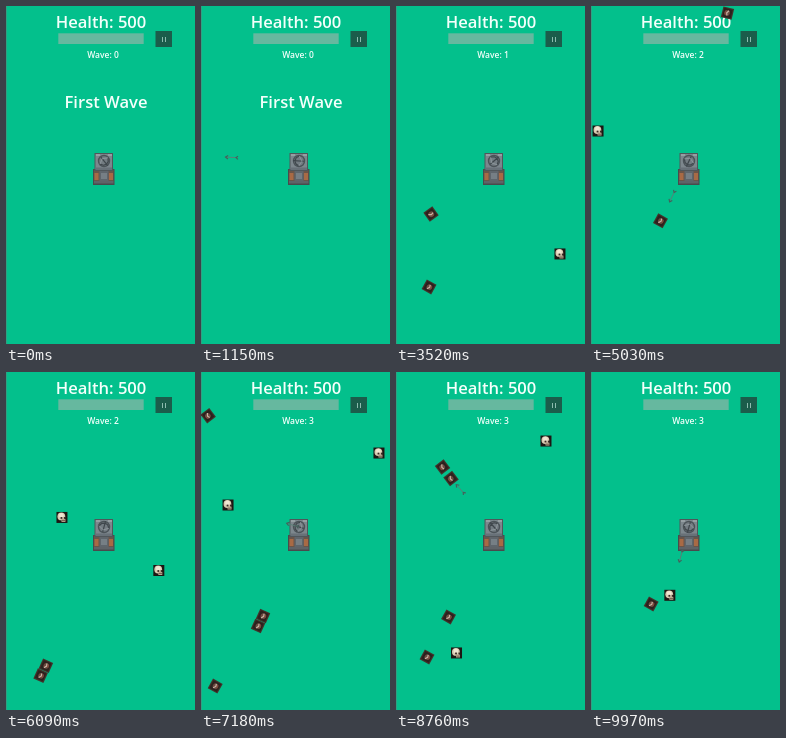
Recreate the animation shown at these times as an HTML page with a canvas. Size 189 px wide and 338 px high, loop 10000 ms.

```html
<!DOCTYPE html>
<html>
<head>
<meta charset="utf-8">
<style>
  html, body { margin: 0; width: 100%; height: 100%; overflow: hidden; background: #03c08c; }
  canvas { display: block; width: 189px; height: 338px; }
</style>
</head>
<body>
<canvas id="stage" width="189" height="338"></canvas>
<script>
const ctx = document.getElementById('stage').getContext('2d');
const LOOP = 10000, WALK = 0.05, FLY = 0.45;
const GOAL = { x: 98, y: 163 }, BOW = { x: 98, y: 155 };
const WAVES = [1760, 4300, 6400];

// kind, x and y at time t, time of death, time of birth
const enemies = [
  ['skull', 180, 79, 2390, 3050, 2240],
  ['beast', 35, 208, 3520, 3900],
  ['skull', 164, 248, 3520, 4450],
  ['beast', 33, 281, 3520, 5085, 2240],
  ['beast', 136.5, 7, 5030, 5950],
  ['skull', 7, 125, 5030, 6350],
  ['skull', 186, 220, 5300, 6750],
  ['skull', 27, 133, 7180, 7316],
  ['beast', 62, 244, 7180, 7640, 5060],
  ['beast', 57, 254, 7180, 8000],
  ['skull', 178, 81, 7180, 8300],
  ['beast', 55, 106.5, 8760, 8789],
  ['beast', 46.5, 95, 8760, 9140, 7200],
  ['beast', 52.5, 245, 8760, 9420],
  ['skull', 150, 69, 8760, 9700, 7200],
  ['skull', 60.5, 281, 8760, 10052],
  ['beast', 31, 285, 8760, 10500]
].map(([kind, x, y, at, death, birth = 0]) => {
  const angle = Math.atan2(GOAL.y - y, GOAL.x - x);
  const pos = t => ({
    x: x + Math.cos(angle) * WALK * (t - at),
    y: y + Math.sin(angle) * WALK * (t - at)
  });
  return { kind, angle, pos, death, birth };
});

function shot(target, end) {
  const dx = target.x - BOW.x, dy = target.y - BOW.y;
  return { angle: Math.atan2(dy, dx), start: end - Math.hypot(dx, dy) / FLY, end };
}

const shots = [
  shot({ x: 20, y: 174 }, 240),
  shot({ x: 3, y: 214 }, 980),
  shot({ x: 4, y: 150 }, 1210),
  shot({ x: 161, y: 94 }, 1420),
  ...enemies.map(e => shot(e.pos(e.death), e.death))
];

function rect(color, x, y, w, h) {
  ctx.fillStyle = color;
  ctx.fillRect(x, y, w, h);
}

function stroke(color, width, ...lines) {
  ctx.strokeStyle = color;
  ctx.lineWidth = width;
  ctx.beginPath();
  for (const [x1, y1, ...rest] of lines) {
    ctx.moveTo(x1, y1);
    for (let i = 0; i < rest.length; i += 2) ctx.lineTo(rest[i], rest[i + 1]);
  }
  ctx.stroke();
}

function disc(color, x, y, r) {
  ctx.fillStyle = color;
  ctx.beginPath();
  ctx.arc(x, y, r, 0, 7);
  ctx.fill();
}

function label(text, x, y, size) {
  ctx.font = `600 ${size}px "Open Sans", sans-serif`;
  ctx.textAlign = 'center';
  ctx.fillStyle = '#f4fffb';
  ctx.fillText(text, x, y);
}

function placed(x, y, angle, draw) {
  ctx.save();
  ctx.translate(x, y);
  ctx.rotate(angle);
  draw();
  ctx.restore();
}

function skull() {
  rect('#1d1613', -5.5, -5.5, 11, 11);
  disc('#d9cbb2', -0.6, -1, 3.9);
  disc('#f0e6d2', -0.6, -2, 2.4);
  rect('#b8a68c', -0.5, 1.5, 4, 3);
  rect('#3a2a24', -1.4, -0.4, 1.8, 1.8);
  rect('#3a2a24', 1.9, -0.4, 1.6, 1.8);
  rect('#5d4a3e', 0, 2.8, 3.2, 0.7);
}

function beast() {
  rect('#43322a', -5.5, -5.5, 11, 11);
  rect('#2c211e', -4.3, -4.3, 8.6, 8.6);
  disc('#6d4a40', 0, 0.4, 2.8);
  stroke('#c9b3a4', 1.2, [-2.6, -1, 0, 0.8, 2.4, 0]);
  stroke('#85483a', 1, [-1, 2.4, 2, 2]);
}

function arrow() {
  stroke('#5b7f76', 0.9, [-6, 0, 6, 0]);
  stroke('#455f5a', 1.1, [3.5, -1.8, 6, 0, 3.5, 1.8], [-6.5, -1.6, -4.5, 0, -6.5, 1.6]);
}

function tower(aim) {
  rect('#4a4a4c', 87, 163, 21.5, 16);
  rect('#6a5549', 88, 164, 19.5, 11);
  rect('#a86a45', 88.5, 167, 4, 7);
  rect('#a86a45', 103, 167, 4, 7);
  rect('#5f666c', 93.5, 164, 9, 11);
  rect('#767f85', 95, 167, 6, 6);
  rect('#5f6468', 88, 175, 19.5, 2.5);
  rect('#50565a', 88.5, 147, 18.5, 18);
  rect('#7d878d', 89.5, 148, 16.5, 15);
  rect('#969fa3', 90, 148, 4, 2);
  rect('#969fa3', 102, 148, 4, 2);
  rect('#687178', 89.5, 161.5, 16.5, 2.5);
  disc('#4b5358', 98, 155, 6.2);
  disc('#737c82', 98, 155, 4.8);
  placed(BOW.x, BOW.y, aim, () => {
    stroke('#3f474c', 1.2, [-5, 0, 6, 0], [0, -5, 3, -3, 4, 0, 3, 3, 0, 5]);
    stroke('#959ea2', 0.7, [0, -5, -3, 0, 0, 5]);
  });
}

function hud(t) {
  label('Health: 500', 95, 22, 16.6);
  rect('#66b89f', 52.3, 27.3, 85.4, 10.7);
  label('Wave: ' + WAVES.filter(w => t >= w).length, 97, 52.3, 8.5);
  rect('#1b5d4b', 149.5, 25, 16.5, 16);
  rect('#8dbbae', 156, 31, 1, 5);
  rect('#8dbbae', 159, 31, 1, 5);
  if (t < WAVES[0]) label('First Wave', 100, 102.3, 16.6);
}

function drawArrow(s, t) {
  const d = (t - s.start) * FLY;
  placed(BOW.x + Math.cos(s.angle) * d, BOW.y + Math.sin(s.angle) * d, s.angle, arrow);
}

function frame(now) {
  const t = now % LOOP;
  rect('#03c08c', 0, 0, 189, 338);
  rect('#2ea283', 0, 0, 1, 338);
  hud(t);

  const fired = shots.filter(s => t >= s.start);
  tower(fired.length ? fired[fired.length - 1].angle : 0.9);

  for (const e of enemies) {
    if (t < e.birth || t >= e.death) continue;
    const { x, y } = e.pos(t);
    if (e.kind === 'skull') placed(x, y, 0, skull);
    else placed(x, y, e.angle, beast);
  }
  for (const s of fired) if (t < s.end) drawArrow(s, t);
  requestAnimationFrame(frame);
}
requestAnimationFrame(frame);
</script>
</body>
</html>
```
